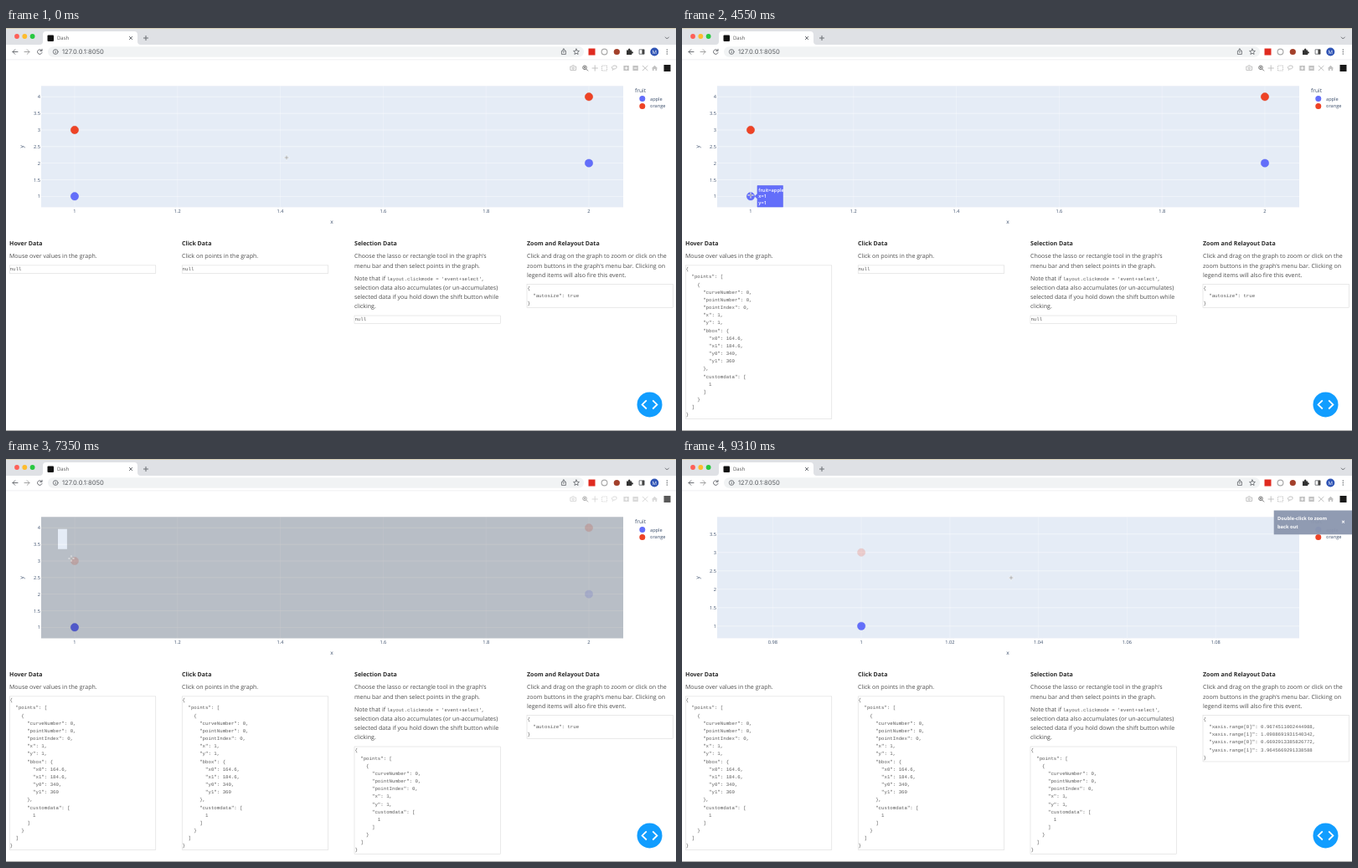
These frames come from a looping animation (800 by 482 pixels, 9380 ms). An HTML page:

```html
<!DOCTYPE html>
<html lang="en">
<head>
<meta charset="utf-8">
<title>Dash</title>
<style>
html, body { margin: 0; width: 100%; height: 100%; overflow: hidden; background: #fff; }
svg { display: block; width: 100vw; height: 100vh; font-family: "Open Sans", sans-serif; text-rendering: geometricPrecision; }
text { white-space: pre; }
.copy { font-size: 7.05px; fill: #4c4c4c; }
.copy .head { font-weight: 700; fill: #2a2a2a; }
.mono { font-family: "Liberation Mono", monospace; font-size: 5.725px; fill: #5c5c5c; }
.axis { font-size: 5.64px; fill: #3c4f6c; }
.title { font-size: 6.6px; }
.line { fill: none; stroke: #5f6368; stroke-linecap: round; stroke-linejoin: round; }
.tool { fill: none; stroke: #c2c2c2; stroke-width: 1; }
</style>
</head>
<body>
<svg viewBox="0 0 800 482" preserveAspectRatio="none">
  <defs><clipPath id="plot"><rect x="42" y="69.3" width="695" height="145.1"/></clipPath></defs>
  <rect width="800" height="482" fill="#fff"/>
  <g id="browser">
    <rect width="800" height="20" fill="#dfe1e5"/>
    <rect width="800" height="1" fill="#d5cdb4"/>
    <circle cx="13" cy="10" r="2.9" fill="#fe5f57"/>
    <circle cx="22.3" cy="10" r="2.9" fill="#febc2e"/>
    <circle cx="31.6" cy="10" r="2.9" fill="#28c840"/>
    <path d="M40 20q4 0 4-4V8q0-4 4-4H153q4 0 4 4v8q0 4 4 4z" fill="#fff"/>
    <rect x="49.5" y="8.5" width="7.5" height="7.5" rx="1" fill="#111"/>
    <text x="61" y="14.2" font-size="6" fill="#555">Dash</text>
    <g class="line" stroke-width=".9">
      <path d="M147.3 10.3l3.4 3.4m0-3.4l-3.4 3.4M164.4 12h5.2M167 9.4v5.2M787.3 11l2 2 2-2"/>
      <path d="M14 28.5H8m2.8-2.8L8 28.5l2.8 2.8"/>
      <path d="M22 28.5h6m-2.8-2.8l2.8 2.8-2.8 2.8" stroke="#999"/>
      <path d="M42.7 27A2.8 2.8 0 1 0 43 29.5M43 25.3V27.4h-2.2"/>
    </g>
    <rect x="50" y="22.3" width="640" height="12.4" rx="6.2" fill="#f1f3f4"/>
    <g class="line" stroke-width=".8">
      <circle cx="59.2" cy="28.5" r="2.9"/>
      <path d="M59.2 28.3v1.6M59.2 26.9v.1"/>
      <path d="M664.4 27.4h-1v4h5v-4h-1M665.9 29.5v-4.6m-1.5 1.4l1.5-1.5 1.5 1.5"/>
      <path d="M681 25l1 2.3 2.4.2-1.8 1.6.5 2.4-2.1-1.3-2.1 1.3.5-2.4-1.8-1.6 2.4-.2z"/>
      <rect x="756.5" y="25.8" width="5.6" height="5.4"/>
    </g>
    <text x="67" y="31.2" font-size="7.6" fill="#5a5d61" style="font-family:Inter,sans-serif">127.0.0.1:8050</text>
    <rect x="695.5" y="24.5" width="8" height="8" fill="#e02b20"/>
    <circle cx="714.5" cy="28.5" r="3.4" fill="none" stroke="#aaa" stroke-width="1.2"/>
    <circle cx="729.3" cy="28.5" r="3.6" fill="#a3402b"/>
    <path d="M741 26.5h2q-.4-2 1.2-2t1.2 2h1.8v1.8q1.7-.2 1.7 1.1t-1.7 1.1v1.6H741z" fill="#333"/>
    <rect x="759.4" y="25.8" width="2.7" height="5.4" fill="#444"/>
    <circle cx="774.3" cy="28.5" r="5" fill="#2f54b5"/>
    <text x="774.3" y="30.8" font-size="6" fill="#fff" text-anchor="middle">M</text>
    <g fill="#5f6368"><circle cx="789.3" cy="26" r=".7"/><circle cx="789.3" cy="28.5" r=".7"/><circle cx="789.3" cy="31" r=".7"/></g>
    <rect y="37.6" width="800" height=".6" fill="#e3e5e8"/>
  </g>
  <g id="tools">
    <path class="tool" d="M673.8 46h2l.6-1.2h1.6l.6 1.2h2v4.4h-6.8zM678.4 48a1.2 1.2 0 1 1-2.4 0 1.2 1.2 0 1 1 2.4 0"/>
    <g class="tool" style="stroke:#777"><circle cx="691" cy="47.3" r="2.3"/><path d="M692.8 49.1l2.2 2.3M689.8 47.3h2.4M691 46.1v2.4"/></g>
    <path class="tool" d="M703.2 44.4v7.2M699.6 48h7.2"/>
    <rect class="tool" x="711.5" y="45" width="6" height="6" stroke-dasharray="1.2 .8"/>
    <path class="tool" d="M724 50.8q1.6-1 .2-2-2-2 .6-3.4 3-1.2 4.2.4 1 2-1.6 3-1.8.6-3 0"/>
    <path d="M737.4 45h6.4v6h-6.4zM748.4 45h6.4v6h-6.4z" fill="#c2c2c2"/>
    <path d="M738.8 48h3.6M740.6 46.2v3.6M749.8 48h3.6" stroke="#fff"/>
    <path class="tool" d="M760 45l6.4 6m0-6l-6.4 6"/>
    <path d="M770.8 48.2l3.7-3.4 3.7 3.4h-1V51h-1.8v-2h-1.8v2h-1.8v-2.8z" fill="#c2c2c2"/>
  </g>
  <rect id="badge" x="785.5" y="44" width="8" height="8" fill="#1a1a1a"/>
  <g id="chart"></g>
  <g class="axis">
    <text class="title" x="389" y="233.7" text-anchor="middle">x</text>
    <text class="title" transform="translate(21.2 141.8) rotate(-90)" text-anchor="middle">y</text>
    <text class="title" x="751" y="77.3">fruit</text>
    <text x="769" y="86.5">apple</text>
    <text x="769" y="95.4">orange</text>
    <circle cx="759.8" cy="84.5" r="3.5" fill="#636efa"/>
    <circle cx="759.8" cy="93.4" r="3.5" fill="#ee4326"/>
  </g>
  <g class="copy" id="copy"></g>
  <g id="panels"></g>
  <circle cx="768.5" cy="450.4" r="15" fill="#119dff"/>
  <path d="M764.8 445.3l-5.2 5.1 5.2 5.1M772.2 445.3l5.2 5.1-5.2 5.1" fill="none" stroke="#fff" stroke-width="1.8"/>
  <g id="notice">
    <rect x="706.7" y="61.5" width="93.3" height="28.8" fill="#8c97af"/>
    <g fill="#fff" font-size="5.7" font-weight="700">
      <text x="711" y="73.2">Double-click to zoom</text>
      <text x="711" y="82.8">back out</text>
      <text x="787.3" y="77.6" font-size="8">×</text>
    </g>
  </g>
  <g id="cursor"></g>
  <rect y="481" width="800" height="1" fill="#a5a5a5"/>
</svg>
<script>
const LOOP = 9380, STEP = 70;
const CLICK = 4830, DRAG = 7100, RELEASE = 8200;
const LEFT = 42, RIGHT = 737, TOP = 69.3, BOTTOM = 214.4;
const ROW = 9.16;
const FULL = { x: [0.9349, 2.0668], y: [0.67, 4.327], xStep: 0.2 };
const ZOOM = { x: [0.9674511002444988, 1.0988691931540342], y: [0.6692913385826772, 3.9645669291338588], xStep: 0.02 };
const COLORS = { apple: ['#636efa', '#525ded', '#fff'], orange: ['#ee4326', '#d93a1e', '#444'] };
const POINTS = [['apple', 1, 1], ['apple', 2, 2], ['orange', 1, 3], ['orange', 2, 4]]
  .map(([fruit, x, y]) => ({ fruit, x, y }));
const [APPLE1, APPLE2, ORANGE1, ORANGE2] = POINTS;

const HOVERS = [
  { from: 1190, to: 2170, point: ORANGE1 },
  { from: 2450, to: 2900, point: ORANGE2 },
  { from: 3010, to: 3570, point: APPLE2 },
  { from: 4060, to: 5740, point: APPLE1 }
];
// time, x, y
const PATH = [
  [0, 335, 155], [420, 335, 155], [840, 227, 156], [980, 227, 156], [1260, 82, 114], [2100, 82, 114],
  [2500, 696, 84], [2800, 696, 84], [3050, 696, 160], [3500, 696, 160], [4130, 82, 200], [5670, 82, 200],
  [6230, 261, 153], [6950, 62, 84], [DRAG, 62, 84], [7350, 78, 119], [8120, 143, 217], [8400, 143, 217], [9310, 393, 142]
];

const $ = id => document.getElementById(id);
const clamp = (v, lo = 0, hi = 1) => Math.min(hi, Math.max(lo, v));
const ramp = (t, start, length) => clamp((t - start) / length);
const smooth = u => u * u * (3 - 2 * u);
const label = (x, y, s, attrs = '') => `<text x="${x}" y="${y}" ${attrs}>${s}</text>`;

function cursorAt(t) {
  const i = PATH.findIndex(p => p[0] > t);
  if (i < 0) return PATH[PATH.length - 1].slice(1);
  const [a, b] = [PATH[i - 1], PATH[i]];
  const u = (t - a[0]) / (b[0] - a[0]);
  const k = t > DRAG && t < RELEASE ? u : smooth(u);
  return [a[1] + (b[1] - a[1]) * k, a[2] + (b[2] - a[2]) * k];
}

function ticks([lo, hi], step) {
  const out = [];
  for (let i = Math.ceil(lo / step); i * step <= hi; i++) out.push(+(i * step).toFixed(2));
  return out;
}

function hoverLabel({ fruit, x, y }, px, py) {
  const [fill, edge, ink] = COLORS[fruit];
  const width = fruit === 'apple' ? 30.5 : 35.5, l = px + 8, r = l + width;
  const rows = [`fruit=${fruit}`, `x=${x}`, `y=${y}`];
  return `<path d="M${px + 5} ${py}l3-3V${py - 12.8}H${r}V${py + 12.8}H${l}V${py + 3}z" fill="${fill}" stroke="${fruit === 'apple' ? edge : ink}" stroke-width=".5"/>`
    + `<g font-size="5.7" fill="${ink}" ${fruit === 'apple' ? 'font-weight="600"' : ''}>`
    + rows.map((s, i) => label(l + 1.4, py - 5.8 + i * 7.7, s)).join('') + '</g>';
}

function chart(t) {
  const view = t >= RELEASE ? ZOOM : FULL;
  const scale = ([lo, hi], a, b) => v => a + (v - lo) / (hi - lo) * (b - a);
  const sx = scale(view.x, LEFT, RIGHT), sy = scale(view.y, BOTTOM, TOP);
  const xs = ticks(view.x, view.xStep), ys = ticks(view.y, 0.5);
  let s = `<rect x="${LEFT}" y="${TOP}" width="${RIGHT - LEFT}" height="${BOTTOM - TOP}" fill="#e5ecf6"/>`;
  s += '<g stroke="#fff" stroke-width=".6">'
    + xs.map(v => `<path d="M${sx(v)} ${TOP}V${BOTTOM}" opacity=".45"/>`).join('')
    + ys.map(v => `<path d="M${LEFT} ${sy(v)}H${RIGHT}" opacity=".8"/>`).join('') + '</g>';
  s += '<g class="axis">'
    + xs.map(v => label(sx(v), 220.5, v, 'text-anchor="middle"')).join('')
    + ys.map(v => label(41, sy(v) + 2.1, v, 'text-anchor="end"')).join('') + '</g>';
  s += '<g clip-path="url(#plot)">' + POINTS.map(p => {
    const [fill, edge] = COLORS[p.fruit];
    const opacity = t >= CLICK && p !== APPLE1 ? 0.2 : 1;
    return `<circle cx="${sx(p.x)}" cy="${sy(p.y)}" r="4.7" fill="${fill}" stroke="${edge}" stroke-width=".4" opacity="${opacity}"/>`;
  }).join('') + '</g>';
  if (t >= DRAG && t < RELEASE) {
    const [x, y] = cursorAt(Math.max(DRAG, t - 80));
    const hole = `M62 83.8H${x}V${Math.min(y, BOTTOM)}H62z`;
    s += `<path d="M${LEFT} ${TOP}H${RIGHT}V${BOTTOM}H${LEFT}z${hole}" fill-rule="evenodd" opacity="${0.3 * smooth(ramp(t, 7230, 200))}"/>`;
  }
  const hover = HOVERS.find(h => t >= h.from && t < h.to);
  if (hover) s += hoverLabel(hover.point, sx(hover.point.x), sy(hover.point.y));
  return s;
}

function eventData({ fruit, x, y }, withBox) {
  const x0 = x === 1 ? 164.6 : 1471.4;
  const y0 = [0, 340, 255.33, 170.67000000000002, 86][y];
  const box = { x0, x1: x0 + 20, y0, y1: y0 + 20 };
  return { points: [{
    curveNumber: fruit === 'apple' ? 0 : 1, pointNumber: x - 1, pointIndex: x - 1, x, y,
    ...(withBox && { bbox: box }), customdata: [y]
  }] };
}

function panel(x, y, value) {
  const rows = JSON.stringify(value, null, 2).split('\n');
  return `<rect x="${x}" y="${y}" width="174.6" height="${rows.length * ROW + 0.5}" fill="#fff" stroke="#d3d3d3" stroke-width=".5"/>`
    + '<g class="mono">' + rows.map((s, i) => label(x + 0.4, y + 6.4 + i * ROW, s)).join('') + '</g>';
}

function panels(t) {
  const hovered = HOVERS.filter(h => h.from <= t).pop();
  const clicked = t >= CLICK;
  const layout = t < RELEASE ? { autosize: true } : {
    'xaxis.range[0]': ZOOM.x[0], 'xaxis.range[1]': ZOOM.x[1],
    'yaxis.range[0]': ZOOM.y[0], 'yaxis.range[1]': ZOOM.y[1]
  };
  return panel(4.2, 283.9, hovered ? eventData(hovered.point, true) : null)
    + panel(210.2, 283.9, clicked ? eventData(APPLE1, true) : null)
    + panel(416, 344, clicked ? eventData(APPLE1) : null)
    + panel(622, 306.5, layout);
}

function cursor(t) {
  const [x, y] = cursorAt(t);
  const at = `transform="translate(${x} ${y})"`;
  if (t >= RELEASE && y > BOTTOM)
    return `<path ${at} d="M0-3v6.6l1.5-1.3 1 2.2 1-.5-1-2.1h2z" fill="#111" stroke="#fff" stroke-width=".4"/>`;
  const plus = 'd="M-2.5 0h5M0-2.5v5"';
  return `<g ${at}><path ${plus} stroke="#fff" stroke-width="1.8" opacity=".6" stroke-linecap="square"/><path ${plus} stroke="#888" stroke-width=".6"/></g>`;
}

const COPY = [
  [4, 'Hover Data', 'Mouse over values in the graph.'],
  [210, 'Click Data', 'Click on points in the graph.'],
  [416, 'Selection Data', "Choose the lasso or rectangle tool in the graph's", 'menu bar and then select points in the graph.'],
  [622, 'Zoom and Relayout Data', 'Click and drag on the graph to zoom or click on the', "zoom buttons in the graph's menu bar. Clicking on", 'legend items will also fire this event.']
];
const NOTE = [
  `Note that if <tspan class="mono">layout.clickmode = 'event+select'</tspan>,`,
  'selection data also accumulates (or un-accumulates)',
  'selected data if you hold down the shift button while',
  'clicking.'
];
$('copy').innerHTML = COPY.map(([x, head, ...rows]) =>
  label(x, 260.4, head, 'class="head"') + rows.map((s, i) => label(x, 275.4 + i * 11.27, s)).join('')
).join('') + NOTE.map((s, i) => label(416, 301.6 + i * 11.27, s)).join('');

let shown = -1;
function draw(now) {
  const t = Math.floor(now % LOOP / STEP) * STEP;
  if (t !== shown) {
    shown = t;
    const idle = ramp(t, 7230, 300) - ramp(t, 8540, 300);
    $('chart').innerHTML = chart(t);
    $('panels').innerHTML = panels(t);
    $('cursor').innerHTML = cursor(t);
    $('tools').setAttribute('opacity', 1 - 0.95 * idle);
    $('badge').setAttribute('opacity', 1 - 0.7 * idle);
    $('notice').setAttribute('opacity', 0.96 * ramp(t, 8400, 700));
  }
  requestAnimationFrame(draw);
}
draw(performance.now());
</script>
</body>
</html>
```
